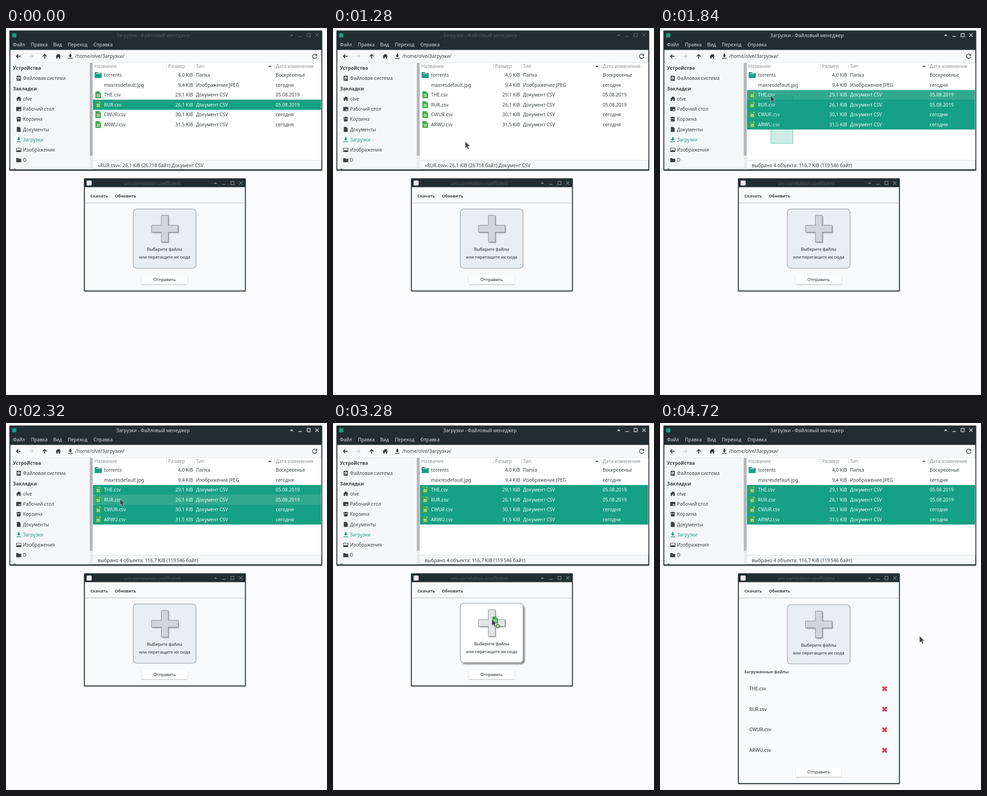
An HTML page that plays this animation: 701 by 799 pixels, repeating every 4.76 s.

```html
<!DOCTYPE html>
<html lang="ru">
<head>
<meta charset="utf-8">
<title>uni-correlation-coefficient</title>
<style>
html, body { margin: 0; width: 100%; height: 100%; overflow: hidden; background: #fcfbfe; }
svg { display: block; }
text { font-family: "Noto Sans", "Open Sans", sans-serif; font-size: 10.25px; white-space: pre; }
.b { font-weight: 700; }
.m { fill: #4a5154; stroke: #4a5154; stroke-width: .22px; }
.s { font-size: 9.15px; }
.sb { font-size: 8.9px; font-weight: 600; }
.win { filter: drop-shadow(0 1px 1.5px rgba(0, 0, 0, .22)); }
</style>
</head>
<body>
<svg id="stage" width="701" height="799" viewBox="0 0 701 799"></svg>
<script>
const LOOP = 4760, DARK = '#222d32', INK = '#3c4346', TEAL = '#16a085', HOVER = '#32a98f';
const stage = document.getElementById('stage');

const text = (x, y, str, attrs = '') => `<text x="${x}" y="${y}" ${attrs}>${str}</text>`;
const rect = (x, y, w, h, fill, attrs = '') =>
  `<rect x="${x}" y="${y}" width="${w}" height="${h}" fill="${fill}" ${attrs}/>`;
const path = (d, attrs = '') => `<path d="${d}" ${attrs}/>`;
const at = (x, y, body, attrs = '') => `<g transform="translate(${x} ${y})" ${attrs}>${body}</g>`;
const line = (d, color, w = 1) => path(d, `fill="none" stroke="${color}" stroke-width="${w}"`);

// Icons are centred on 0,0
const icon = {
  back: path('M5-.9H-1.6L1-3.6-.3-4.8-5 0-.3 4.8 1 3.6-1.6 .9H5Z'),
  home: path('M0-5.3-5.8 .2H-4.2V5H-1.2V1.6H1.2V5H4.2V.2H5.8L3.8-1.7V-4.4H2.4V-3Z'),
  load: path('M-1.5-5.5H1.5V-1.5H4L0 2.6-4-1.5H-1.5ZM-5 3.8H5V5.3H-5Z'),
  disk: path('M-4.5-5.5H4.5V5.5H-4.5ZM0-3.6A2.9 2.9 0 1 0 .01-3.6ZM-3 3.3V4.3H-1V3.3Z', 'fill-rule="evenodd"') +
    '<circle r="1.2" cy="-.7"/>',
  desk: path('M-5.5-4.5H5.5V4.5H-5.5ZM0 1V3H4V1Z', 'fill-rule="evenodd"'),
  trash: path('M-2-5.2H2L3-4H5V-1.5H-5V-4H-3ZM-4.6-.6H4.6L3.6 5H-3.6Z'),
  doc: path('M-4.2-5.5H1.2L4.2-2.5V5.5H-4.2Z'),
  image: path('M-5.5-4.5H5.5V4.5H-5.5ZM-4.3-3.3V2.8L-1.6-.4 .4 1.7 2.2-.2 4.3 2.2V-3.3Z', 'fill-rule="evenodd"'),
  folder: path('M-5.5-4.5H-1L.3-3H5.5V4.5H-5.5Z'),
};
const sheet = path('M-6-7.5H2.5L6.3-3.7V7.5H-6Z', 'fill="#43a848"') +
  path('M2.5-7.5 6.3-3.7H2.5Z', 'fill="#a5d6a7"') +
  rect(-3.2, -1.2, 6.4, 5.8, '#e6f4e6') +
  line('M-3.2 .8H3.2M-3.2 2.7H3.2M0-1.2V4.6', '#43a848', .8);
const bigFolder = path('M-7.5-6.3H-1.5L0-4.6H7.5V6.5H-7.5Z', 'fill="#0c7561"') +
  rect(-7.5, -2.6, 15, 9.1, '#16a085') + rect(-5.5, -4, 11, 1.4, '#e8f5f1');

const buttons = (x, y) => at(x, y,
  path('M-4 1.7 0-2 4 1.7Z', 'fill="currentColor"') +
  line('M14.5 3H22', 'currentColor', 1.5) +
  line('M33.5-3.5H40.5V3.5H33.5Z', 'currentColor', 1.4) +
  line('M51.3-3.8 58.9 3.8M58.9-3.8 51.3 3.8', 'currentColor', 1.4));

const files = [
  ['torrents', '4,0 KiB', 'Папка', 'Воскресенье'],
  ['maxresdefault.jpg', '9,4 KiB', 'Изображение JPEG', 'сегодня'],
  ['THE.csv', '29,1 KiB', 'Документ CSV', '05.08.2019'],
  ['RUR.csv', '26,1 KiB', 'Документ CSV', '05.08.2019'],
  ['CWUR.csv', '30,1 KiB', 'Документ CSV', 'сегодня'],
  ['ARWU.csv', '31,5 KiB', 'Документ CSV', 'сегодня'],
];
const ROW = 21.5, rowTop = i => 91.7 + i * ROW;

const fileRow = ([name, size, kind, date], i) => {
  const mid = rowTop(i) + ROW / 2, y = mid + 3.6;
  const pic = i === 0 ? bigFolder : i > 1 ? sheet : '';
  return `<g class="row" fill="${INK}">` +
    rect(190, rowTop(i), 498, ROW, 'none', 'shape-rendering="crispEdges"') + at(201.3, mid, pic) +
    text(214, y, name) + text(408.5, y, size, 'text-anchor="end"') + text(415, y, kind) + text(589, y, date) + '</g>';
};

const places = [
  [0, 'Устройства'], ['disk', 'Файловая система'], [0, 'Закладки'], ['home', 'olve'], ['desk', 'Рабочий стол'],
  ['trash', 'Корзина'], ['doc', 'Документы'], ['load', 'Загрузки'], ['image', 'Изображения'], ['folder', 'D'], [0, 'Сеть'],
];
const place = ([pic, name], i) => {
  const y = 87.3 + i * 22.26;
  return pic
    ? `<g fill="${pic === 'load' ? TEAL : INK}">${at(27.8, y, icon[pic])}${text(37, y + 3.7, name)}</g>`
    : text(15, y + 3.7, name, `class="b" fill="${INK}"`);
};

const manager = `<g class="win">${rect(7.5, 5.5, 683, 305, DARK, 'rx="1.5"')}</g>
  ${rect(9.5, 47.7, 679, 260, '#f7f8fa')}
  ${rect(13.5, 11.5, 9, 9, TEAL)}
  <g id="caption">${text(321, 19.6, 'Загрузки - Файловый менеджер', 'text-anchor="middle" fill="currentColor"')}${buttons(624, 15.5)}</g>
  ${[[15, 'Файл'], [54.5, 'Правка'], [103, 'Вид'], [135, 'Переход'], [191, 'Справка']]
    .map(([x, s]) => text(x, 39.8, s, 'fill="#d5dadd"')).join('')}
  <g fill="#2f3639">
    ${at(26.5, 61.5, icon.back)}
    <g transform="translate(55.5 61.5) scale(-1 1)" fill="#d2d5d8">${icon.back}</g>
    <g transform="translate(84.5 61.5) rotate(90)">${icon.back}</g>
    ${at(114, 61.5, icon.home)}${at(140.5, 61.5, icon.load)}
  </g>
  ${text(151, 65.2, '/home/olve/Загрузки/', `fill="${INK}"`)}
  ${line('M678.2 59A4.8 4.8 0 1 0 678.8 62.5', '#3c4346', 1.4)}
  ${path('M679.4 56V60.6H674.8Z', 'fill="#3c4346"')}
  ${line('M10 75.8H688', '#e3e5e7')}
  <svg x="9.5" y="76" width="180.5" height="231.7" viewBox="9.5 76 180.5 231.7">
    ${rect(9.5, 76, 173.5, 232, '#f5f6f8')}${places.map(place).join('')}
    ${rect(183, 76, 7, 232, '#e9eaec')}${rect(183, 76, 6, 202, '#b4b6b8')}
  </svg>
  ${rect(190, 76, 498.5, 212, '#fefefe')}
  ${[[193, 'Название'], [354, 'Размер'], [415, 'Тип'], [589, 'Дата изменения']]
    .map(([x, s]) => text(x, 87.4, s, 'fill="#8c9194"')).join('')}
  ${line('M350.5 77V91M411.5 77V91M586.5 77V91', '#dcdee0')}
  ${path('M572.5 85 576.3 81 580.1 85Z', 'fill="#5c6366"')}
  ${files.map(fileRow).join('')}
  ${line('M190 288H688', '#dcdfe2')}
  ${text(200.5, 302.7, '', `id="status" fill="${INK}"`)}
  ${rect(0, 0, 0, 0, TEAL, `id="band" fill-opacity=".2" stroke="${TEAL}" stroke-opacity=".65"`)}`;

const plus = 'M-7.5-29H7.5V-7.5H29V7.5H7.5V29H-7.5V7.5H-29V-7.5H-7.5Z';
const cross = line('M-4.5-4.5 4.5 4.5M4.5-4.5-4.5 4.5', '#df424e', 4);

const uploader = `<g class="win"><rect id="frame" x="170.3" y="327.2" width="353.4" fill="${DARK}" rx="1.5"/></g>
  <rect id="body" x="172.2" y="346.5" width="349.6" fill="#f8fafc"/>
  ${rect(176, 332, 11, 11, '#f4e9f1', 'rx="2"')}
  <g color="#767f84">${text(319.5, 341.5, 'uni-correlation-coefficient', 'text-anchor="middle" fill="#535d62"')}${buttons(457.5, 337.5)}</g>
  ${text(184.3, 368.6, 'Скачать', `class="sb" fill="${INK}"`)}${text(237.8, 368.6, 'Обновить', `class="sb" fill="${INK}"`)}
  ${line('M172.5 380.8H521.5', '#c9bec6', 1.2)}
  <g id="zone">
    <rect id="shade" x="281" y="398" width="138" height="129" rx="8" fill="#000" opacity=".42" style="filter: blur(1.8px)"/>
    <rect id="card" x="278" y="394" width="137" height="129" rx="7.5" stroke="#a8afb2" stroke-width="1.6"/>
    ${at(348.6, 438.9, path(plus, 'fill="#000" opacity=".35" style="filter: blur(1px)"'))}
    ${at(346.8, 437, path(plus, 'id="plus" stroke="#7d8386" stroke-linejoin="round"'))}
    <g text-anchor="middle">
      ${text(346.5, 485.3, 'Выберите файлы', 'class="s m" id="pick"')}
      ${text(346.5, 502.3, 'или перетащите их сюда', 'class="s m"')}
    </g>
  </g>
  <g id="list">
    ${text(183.3, 545.4, 'Загруженные файлы', `class="sb" fill="#50575a"`)}
    ${files.slice(2).map(([name], i) => {
      const y = 578.3 + i * 44.8;
      return text(195, y + 3.5, name, 'class="m"') + at(490.5, y, cross);
    }).join('')}
  </g>
  <g id="send">
    ${rect(296.5, 538, 100, 21, '#000', 'rx="2" opacity=".22" style="filter: blur(1px)"')}
    ${rect(296.5, 537, 100, 20.5, '#fff', 'rx="1.5"')}
    ${text(346.5, 550.7, 'Отправить', 'class="s m" text-anchor="middle"')}
  </g>`;

const pointer = `<g id="pointer">
  <g id="cargo">${at(7, 2, sheet)}<circle cx="13" cy="15" r="4.6" fill="#43a848"/>${line('M10.6 15H15.4M13 12.6V17.4', '#fff', 1.2)}</g>
  ${path('M0 0V14.2L3.2 11.4 5.5 16.6 8 15.5 5.7 10.5 9.6 9.8Z', 'fill="#3a3f42" stroke="#c9cccd" stroke-width=".8"')}
</g>`;

stage.innerHTML = rect(0, 0, 701, 799, '#fcfbfe') + manager + uploader + pointer;

const el = Object.fromEntries([...stage.querySelectorAll('[id]')].map(n => [n.id, n]));
const rows = [...stage.querySelectorAll('.row')];
const set = (node, attrs) => { for (const k in attrs) node.setAttribute(k, attrs[k]); };
const show = (node, on) => set(node, { visibility: on ? 'visible' : 'hidden' });

// time, x, y of the pointer tip
const track = [
  [680, 579, 484], [1200, 300, 260], [1280, 289, 247], [1320, 290, 251], [1560, 261.5, 172],
  [1760, 243, 148], [1920, 240, 146], [2160, 246, 160], [2320, 249, 165], [2440, 249, 166],
  [2880, 312, 313], [3120, 343, 418], [3280, 347, 427], [3440, 350, 430], [3600, 356.5, 438],
  [4340, 356.5, 438], [4720, 567, 464],
];
function tip(t) {
  const i = track.findIndex(k => k[0] > t);
  if (i === 0) return track[0].slice(1);
  if (i < 0) return track.at(-1).slice(1);
  const [a, b] = [track[i - 1], track[i]], p = (t - a[0]) / (b[0] - a[0]);
  return [a[1] + (b[1] - a[1]) * p, a[2] + (b[2] - a[2]) * p];
}

const STATUS = [
  [1840, 'выбрано 4 объекта: 116,7 KiB (119\u2009546 байт)'],
  [1320, '6 объектов: 126,1 KiB (129\u2009165 байт), свободного места: 181,7 GiB'],
  [0, '«RUR.csv»: 26,1 KiB (26\u2009718 байт) Документ CSV'],
];

function draw(t) {
  const [x, y] = tip(t), [lagX, lagY] = tip(t - 40);
  const banding = t >= 1360 && t < 2000, dragging = t >= 2440 && t < 3480, listed = t >= 3800;

  set(el.caption, { color: t >= 1320 ? '#d5dadd' : '#535d62' });
  el.status.textContent = STATUS.find(s => t >= s[0])[1];

  rows.forEach((row, i) => {
    const top = rowTop(i);
    const on = t < 1240 ? i === 3 : t < 1360 ? false : banding ? i > 1 && lagY < top + ROW : i > 1;
    const hot = t >= 1240 && t < 2440 && lagY >= top && lagY < top + ROW;
    set(row, { fill: on ? '#f4fbf9' : INK });
    set(row.firstChild, { fill: on ? (hot ? HOVER : TEAL) : 'none' });
  });

  show(el.band, banding);
  if (banding) set(el.band, { x: lagX, y: lagY, width: Math.max(0, 290 - lagX), height: Math.max(0, 251 - lagY) });

  const over = t >= 2880 && x > 278 && x < 415 && y > 394 && y < 523;
  set(el.zone, { transform: `translate(0 ${(listed ? 1.5 : 0) - (over ? 1.5 : 0)})` });
  set(el.card, { fill: over ? '#fefefe' : '#e7eff3' });
  set(el.plus, { fill: over ? '#e3e5e6' : '#d0d7da' });
  set(el.pick, { 'text-decoration': over && !dragging ? 'underline' : 'none' });
  show(el.shade, over);

  set(el.frame, { height: listed ? 458.8 : 246.3 });
  set(el.body, { height: listed ? 437.5 : 225 });
  set(el.send, { transform: `translate(0 ${listed ? 212.7 : 0})` });
  show(el.list, listed);

  set(el.pointer, { transform: `translate(${x} ${y})`, display: t >= 680 ? 'inline' : 'none' });
  show(el.cargo, dragging);
}

const start = performance.now();
function tick() {
  draw((performance.now() - start) % LOOP);
  requestAnimationFrame(tick);
}
tick();
</script>
</body>
</html>
```
